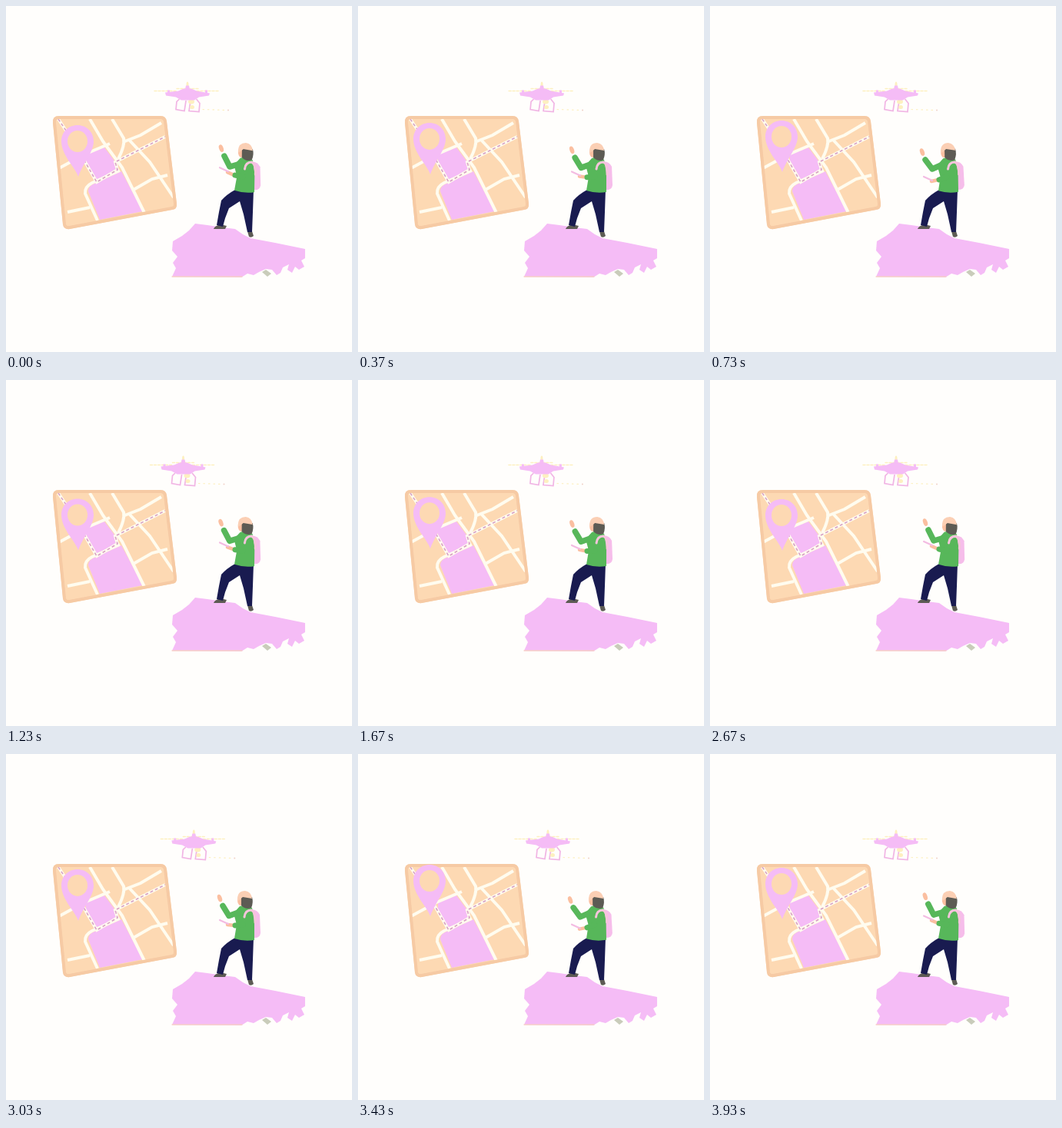
An HTML page with a canvas for the animation above (3.96 s loop, 450x450 px).

```html
<!DOCTYPE html>
<html lang="en">
<head>
<meta charset="utf-8">
<title>Drone survey</title>
<style>
html, body { margin: 0; width: 100%; height: 100%; overflow: hidden; background: #fffefc; }
canvas { display: block; width: 450px; height: 450px; }
</style>
</head>
<body>
<canvas id="stage"></canvas>
<script>
const LOOP = 3960;
const SWAY = LOOP / 3;
const TIMES = [0, 730, 1230, 2100, 2670, 3430, 3930];
const DRONE_X = [236, 242, 230.5, 247, 242, 247, 242];
const PIN_Y = [176, 170, 175.5, 171, 176, 165, 169];

const PINK = '#f5bcf6', PEACH = '#fdd9b3', EDGE = '#f6caa4', ROAD = '#fffcef';
const GREEN = '#57b75a', NAVY = '#191b50', SKIN = '#fbbfa0', DARK = '#5d5b54', PALE = '#fdf0c0';

const canvas = document.getElementById('stage');
const ctx = canvas.getContext('2d');
const ratio = window.devicePixelRatio || 1;
canvas.width = canvas.height = 450 * ratio;

const lerp = (a, b, p) => a + (b - a) * p;

// Eased value of a track at time t
function track(values, t) {
  let i = 0;
  while (i < TIMES.length - 2 && t >= TIMES[i + 1]) i++;
  const p = Math.min(1, (t - TIMES[i]) / (TIMES[i + 1] - TIMES[i]));
  return lerp(values[i], values[i + 1], (1 - Math.cos(Math.PI * p)) / 2);
}

// 0 is leaning forward, 1 is leaning back
const leanAt = t => 0.5 + 0.5 * Math.cos(2 * Math.PI * (t - 60) / SWAY);

function fill(color, d) {
  ctx.fillStyle = color;
  ctx.fill(new Path2D(d));
}

function stroke(color, width, d, dash = []) {
  ctx.strokeStyle = color;
  ctx.lineWidth = width;
  ctx.setLineDash(dash);
  ctx.stroke(new Path2D(d));
  ctx.setLineDash([]);
}

function oval(color, x, y, rx, ry, turn = 0) {
  ctx.fillStyle = color;
  ctx.beginPath();
  ctx.ellipse(x, y, rx, ry, turn, 0, 2 * Math.PI);
  ctx.fill();
}

function drawMap() {
  const sheet = 'M69 143H201Q208 143 209 150L222 257Q223 264 216 265L83 290Q75 291 74 284L61 152Q60 143 69 143Z';
  fill(PEACH, sheet);
  ctx.save();
  ctx.clip(new Path2D(sheet));
  ctx.lineCap = 'butt';
  fill(PINK, 'M104 193L128 184L146 208L142 216L119 229L104 204Z');
  fill(PINK, 'M107 241Q107 234 115 231L150 215L178 267L122 278Z');
  stroke(ROAD, 4, 'M109 147L126 176L151 210L180 269');
  stroke(ROAD, 4, 'M138 147L153 172Q155 181 146 199');
  stroke(ROAD, 4, 'M152 177L175 168L202 152M160 174L187 203L218 249');
  stroke(ROAD, 4, 'M164 240L190 225L210 220');
  stroke(ROAD, 4, 'M69 211L102 193L135 179');
  stroke(ROAD, 4, 'M148 214L112 230Q102 235 103 244L119 279M80 268L109 262');
  const route = 'M68 147L82 168L103 203L118 229L145 213L142 203L207 170';
  stroke(ROAD, 4, route);
  stroke('#d7a0c4', 1.6, route, [4, 3]);
  stroke(EDGE, 8, sheet);
  ctx.restore();
}

function drawPin(y) {
  ctx.save();
  ctx.translate(93, y);
  fill(PINK, 'M0 -21C12 -21 21 -12 21 0C21 14 8 27 1 46C-2 35 -21 18 -21 0C-21 -12 -12 -21 0 -21Z');
  oval(PEACH, 0, 0, 13, 14);
  ctx.restore();
}

function drawDrone(x) {
  ctx.save();
  ctx.translate(x, 116.5);
  ctx.lineCap = 'round';
  stroke(PALE, 1.4, 'M-43 -6H-14M-14 -9H14M12 -6H42', [3, 2]);
  stroke(PALE, 1.2, 'M20 18L52 19', [1.5, 5]);
  oval('#f0d2c8', 53, 19, 1, 1);
  stroke('#f1b5e4', 1.7, 'M-11 5L-14 8L-15 18L-4 20L-2 7');
  stroke('#f1b5e4', 1.7, 'M4 7L2 20L15 21L16 10L12 5');
  oval(PALE, 5, 8, 4, 3);
  oval(PALE, 6, 15, 3, 2.5);
  oval(PALE, 0, -14, 1.5, 4);
  fill(PINK, 'M-29 -4L-12 -6L-5 -9H5L12 -6L29 -3L28 0L15 2L9 6H-8L-15 2L-28 0Z');
  fill(PINK, 'M-2 -13H2L3 -8H-3ZM-26 -7H-23V-3H-26ZM23 -7H26V-2H23Z');
  ctx.restore();
}

function drawRock() {
  fill(PINK, 'M216 352L221 341L217 334L223 326L216 318L217 306L229 299L238 292L246 283L262 285L282 288L298 290L308 297L318 302L350 308L389 316V328L384 331L388 339L381 343L376 339L372 347L366 343L368 336L360 340L357 347L352 350L346 343L338 342L329 346L322 350L314 348L306 353Z');
  stroke('#f8cfc8', 1.3, 'M216 352H307');
  fill('#c9ccba', 'M333 346L338 343L345 348L340 352Z');
}

function drawLegs() {
  fill(DARK, 'M279 284L287 286L285 290H270Q271 286 279 284Z');
  fill(DARK, 'M314 293H320L322 299Q319 302 316 300Z');
  fill(NAVY, 'M298 239H322L321 268L320 294H314L309 271L304 254L290 263L285 276L282 287L274 285L277 268L280 253Q287 245 298 239Z');
}

function drawPerson(lean) {
  drawLegs();
  ctx.save();
  ctx.translate(312, 241);
  ctx.rotate((lean - 0.5) * 0.035);
  ctx.translate(-312, -241);
  fill('#f6bdea', 'M312 204Q325 199 330 209L331 233Q330 240 322 239L314 236Z');
  fill(GREEN, 'M304 198Q313 195 320 200L323 218L323 242Q309 244 297 240L300 222L296 207Z');
  stroke('#f7c4dc', 3, 'M310 212Q311 203 319 203Q325 206 324 219');
  oval(SKIN, 305, 190, 4, 7);
  fill(DARK, 'M306 186H320Q322 193 319 200Q312 203 306 197Z');
  fill('#fbcfb4', 'M301 189Q301 178 311 178Q319 179 320 188L308 186L302 191Z');
  ctx.restore();

  const hx = lerp(276, 280, lean), hy = lerp(191, 186, lean);
  const ex = lerp(289, 291, lean), ey = lerp(212, 209, lean);
  ctx.lineCap = ctx.lineJoin = 'round';
  oval(SKIN, hx, hy - 1, 2.8, 5, -0.35);
  stroke(GREEN, 7.5, `M305 205L${ex} ${ey}L${hx + 4} ${hy + 9}`);

  const cy = lerp(225, 213, lean), wy = lerp(226, 220, lean);
  stroke(SKIN, 4.5, `M288 ${cy + 3}L297 ${wy}`);
  stroke(GREEN, 7, `M298 ${wy}L308 222`);
  stroke('#f3bbe2', 2.2, `M278 ${cy - 3}L289 ${cy + 2}`);
  ctx.lineJoin = 'miter';
}

function draw(t) {
  ctx.setTransform(ratio, 0, 0, ratio, 0, 0);
  ctx.fillStyle = '#fffefc';
  ctx.fillRect(0, 0, 450, 450);
  drawMap();
  drawPin(track(PIN_Y, t));
  drawDrone(track(DRONE_X, t));
  drawRock();
  drawPerson(leanAt(t));
}

const start = performance.now();
function tick() {
  draw((performance.now() - start) % LOOP);
  requestAnimationFrame(tick);
}
tick();
</script>
</body>
</html>
```
